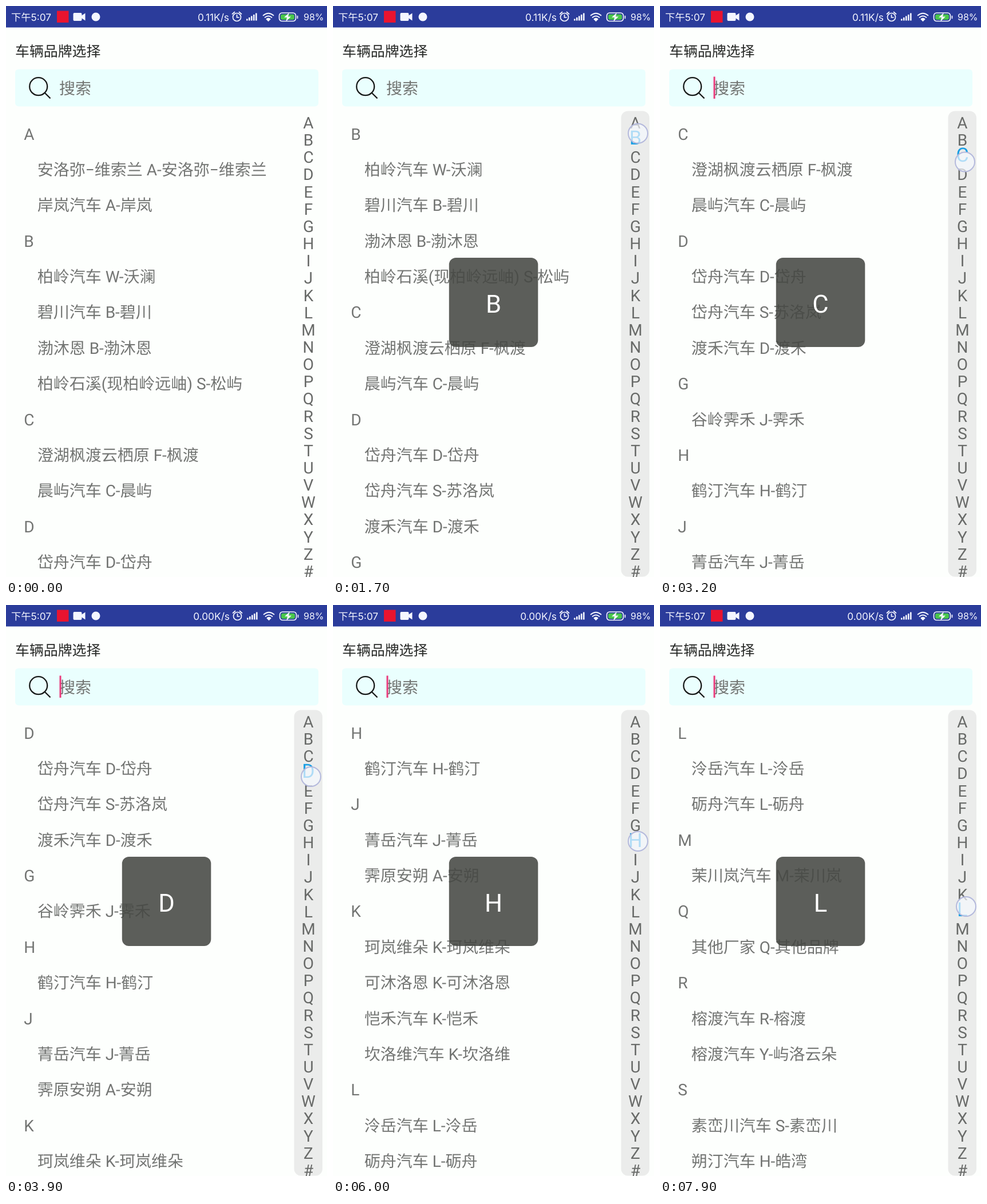
These frames come from a looping animation (561x998 px, 8 s). An HTML page:

```html
<!DOCTYPE html>
<html lang="zh-CN">
<head>
<meta charset="utf-8">
<title>车辆品牌选择</title>
<style>
html, body { margin: 0; width: 100%; height: 100%; overflow: hidden; background: #fdfffd; }
svg { display: block; width: 100%; height: 100%; }
text { font-family: Roboto, "Noto Sans CJK SC DemiLight", "Noto Sans CJK SC", "Noto Sans CJK", sans-serif; font-size: 28px; fill: #737573; white-space: pre; text-rendering: geometricPrecision; }
#status text { font-family: Inter, "Noto Sans CJK SC", "Noto Sans CJK", sans-serif; font-size: 17.3px; fill: #f4f6ff; }
#status #charge { font-size: 16px; }
#title { font-size: 24.9px; fill: #262826; }
#index text { fill: #686a68; text-anchor: middle; }
#index text.on { fill: #1a9fe4; font-size: 34px; }
#popup text { fill: #fff; font-size: 43.6px; text-anchor: middle; }
.line { fill: none; stroke: #f4f6ff; stroke-width: 1.7; stroke-linecap: round; }
.white { fill: #f4f6ff; }
</style>
</head>
<body>
<svg viewBox="0 0 561 998">
  <rect width="561" height="998" fill="#fdfffd"/>
  <g id="status">
    <rect width="561" height="37.5" fill="#2b3c9b"/>
    <text x="9" y="25.5">下午5:07</text>
    <rect x="89" y="8.5" width="20.5" height="20.5" fill="#e9142f"/>
    <path class="white" d="M119.5 12h11q2 0 2 2v2.500l6-4v13l-6-4v2.500q0 2-2 2h-11q-2 0-2-2V14q0-2 2-2z"/>
    <circle class="white" cx="157" cy="19" r="7.5"/>
    <g id="meters">
      <text id="speed" x="391" y="25.5" text-anchor="end"></text>
      <g class="line">
        <circle cx="404.5" cy="19.5" r="7"/>
        <path d="M404.5 15.5v4.500h3.500M396.5 14l4-3.500M412.5 14l-4-3.500"/>
      </g>
      <g id="bars" class="white"></g>
      <g class="line">
        <path d="M450.5 16.5q9-7.500 18 0M453.5 20q6-5 12 0"/>
        <path d="M456.5 23q3-2.500 6 0l-3 3z" fill="#f4f6ff"/>
      </g>
      <rect class="line" x="478.5" y="12" width="29" height="14.5" rx="5"/>
      <rect x="481" y="14.5" width="24" height="9.5" rx="3" fill="#49c64b"/>
      <path class="white" d="M496 11.5l-9 8.500h5l-2 7.500 9-9h-5z"/>
      <path class="line" d="M510.5 17.5v4"/>
    </g>
    <text id="charge" x="520" y="25">98%</text>
  </g>
  <text id="title" x="16" y="88">车辆品牌选择</text>
  <rect x="16" y="110.5" width="530" height="65" rx="6" fill="#eafffe"/>
  <g fill="none" stroke="#171918" stroke-width="2.3">
    <circle cx="56.7" cy="140.7" r="15.5"/>
    <path d="M67.7 151.7L77.5 161.5"/>
  </g>
  <text x="93" y="154">搜索</text>
  <rect id="cursor" x="93.5" y="123.5" width="3" height="38.5" fill="#ea3c7d"/>
  <g id="list"></g>
  <rect id="track" x="503.5" y="183.5" width="49.5" height="814" rx="12" fill="#ebeceb"/>
  <g id="index"></g>
  <g id="popup">
    <rect x="202.8" y="440" width="155.5" height="156" rx="12" fill="#464844" fill-opacity=".88"/>
    <text id="big" x="280.5" y="535.5"></text>
  </g>
  <circle id="finger" r="17" fill="#f6faff" fill-opacity=".68" stroke="#b4b9dc" stroke-width="2"/>
</svg>
<script>
const LOOP = 8000, TICK = 100, TOUCH_START = 500;
const ROW = 62.35, VISIBLE_ROWS = 13, PITCH = 30.15;
const LETTERS = 'ABCDEFGHIJKLMNOPQRSTUVWXYZ#';

// Single-character entries are section headers.
const ENTRIES = `A
安洛弥−维索兰 A-安洛弥−维索兰
岸岚汽车 A-岸岚
B
柏岭汽车 W-沃澜
碧川汽车 B-碧川
渤沐恩 B-渤沐恩
柏岭石溪(现柏岭远岫) S-松屿
C
澄湖枫渡云栖原 F-枫渡
晨屿汽车 C-晨屿
D
岱舟汽车 D-岱舟
岱舟汽车 S-苏洛岚
渡禾汽车 D-渡禾
G
谷岭霁禾 J-霁禾
H
鹤汀汽车 H-鹤汀
J
菁岳汽车 J-菁岳
霁原安朔 A-安朔
K
珂岚维朵 K-珂岚维朵
可沐洛恩 K-可沐洛恩
恺禾汽车 K-恺禾
坎洛维汽车 K-坎洛维
L
泠岳汽车 L-泠岳
砺舟汽车 L-砺舟
M
茉川岚汽车 M-茉川岚
Q
其他厂家 Q-其他品牌
R
榕渡汽车 R-榕渡
榕渡汽车 Y-屿洛云朵
S
素峦川汽车 S-素峦川
朔汀汽车 H-皓湾`.split('\n');

// Time, x and y of the finger.
const FINGER = [
  [500, 533, 205], [1100, 533, 207], [2400, 533, 241], [3900, 533, 300],
  [5200, 533, 365], [6000, 533, 413], [7900, 535, 527]
];

const $ = id => document.getElementById(id);
const show = (el, on) => el.setAttribute('visibility', on ? 'visible' : 'hidden');

function add(parent, tag, attrs, content = '') {
  const el = document.createElementNS('http://www.w3.org/2000/svg', tag);
  for (const name in attrs) el.setAttribute(name, attrs[name]);
  el.textContent = content;
  return parent.appendChild(el);
}

for (let i = 0; i < 5; i++) {
  const height = 3 + i * 2.5;
  add($('bars'), 'rect', { x: 421 + i * 4, y: 25.5 - height, width: 2.6, height });
}
const rows = Array.from({ length: VISIBLE_ROWS }, (_, i) =>
  add($('list'), 'text', { y: 233.7 + i * ROW }));
const marks = [...LETTERS].map((letter, i) =>
  add($('index'), 'text', { x: 528.5, y: 214 + i * PITCH }, letter));

function fingerAt(t) {
  const next = FINGER.findIndex(p => p[0] > t);
  if (next === 0) return FINGER[0].slice(1);
  if (next < 0) return FINGER[FINGER.length - 1].slice(1);
  const [t0, x0, y0] = FINGER[next - 1];
  const [t1, x1, y1] = FINGER[next];
  const u = (t - t0) / (t1 - t0);
  return [x0 + (x1 - x0) * u, y0 + (y1 - y0) * u];
}

// Letters without a section keep the list where it was.
function sectionStart(letterIndex) {
  for (let i = letterIndex; i > 0; i--) {
    const start = ENTRIES.indexOf(LETTERS[i]);
    if (start >= 0) return start;
  }
  return 0;
}

function render(t) {
  const touching = t >= TOUCH_START;
  const [x, y] = fingerAt(t);
  const selected = touching ? Math.floor((y - 189) / PITCH) : -1;
  const start = sectionStart(selected);

  rows.forEach((row, i) => {
    const entry = ENTRIES[start + i] || '';
    row.textContent = entry;
    row.setAttribute('x', entry.length > 1 ? 54.7 : 31.2);
  });
  marks.forEach((mark, i) => {
    mark.setAttribute('class', i === selected ? 'on' : '');
    mark.setAttribute('dy', i === selected ? -2 : 0);
  });
  [$('track'), $('popup'), $('finger')].forEach(el => show(el, touching));
  $('finger').setAttribute('cx', x);
  $('finger').setAttribute('cy', y);
  $('big').textContent = LETTERS[selected] || '';
  show($('cursor'), touching && (t + 200) % 1000 < 500);
  $('speed').textContent = t < 3500 ? '0.11K/s' : '0.00K/s';
  $('meters').setAttribute('transform', `translate(${touching ? 0 : -1} 0)`);
}

let shown = -1;
const origin = performance.now();
function frame() {
  const t = Math.floor((performance.now() - origin) % LOOP / TICK) * TICK;
  if (t !== shown) render(shown = t);
  requestAnimationFrame(frame);
}
frame();
</script>
</body>
</html>
```
